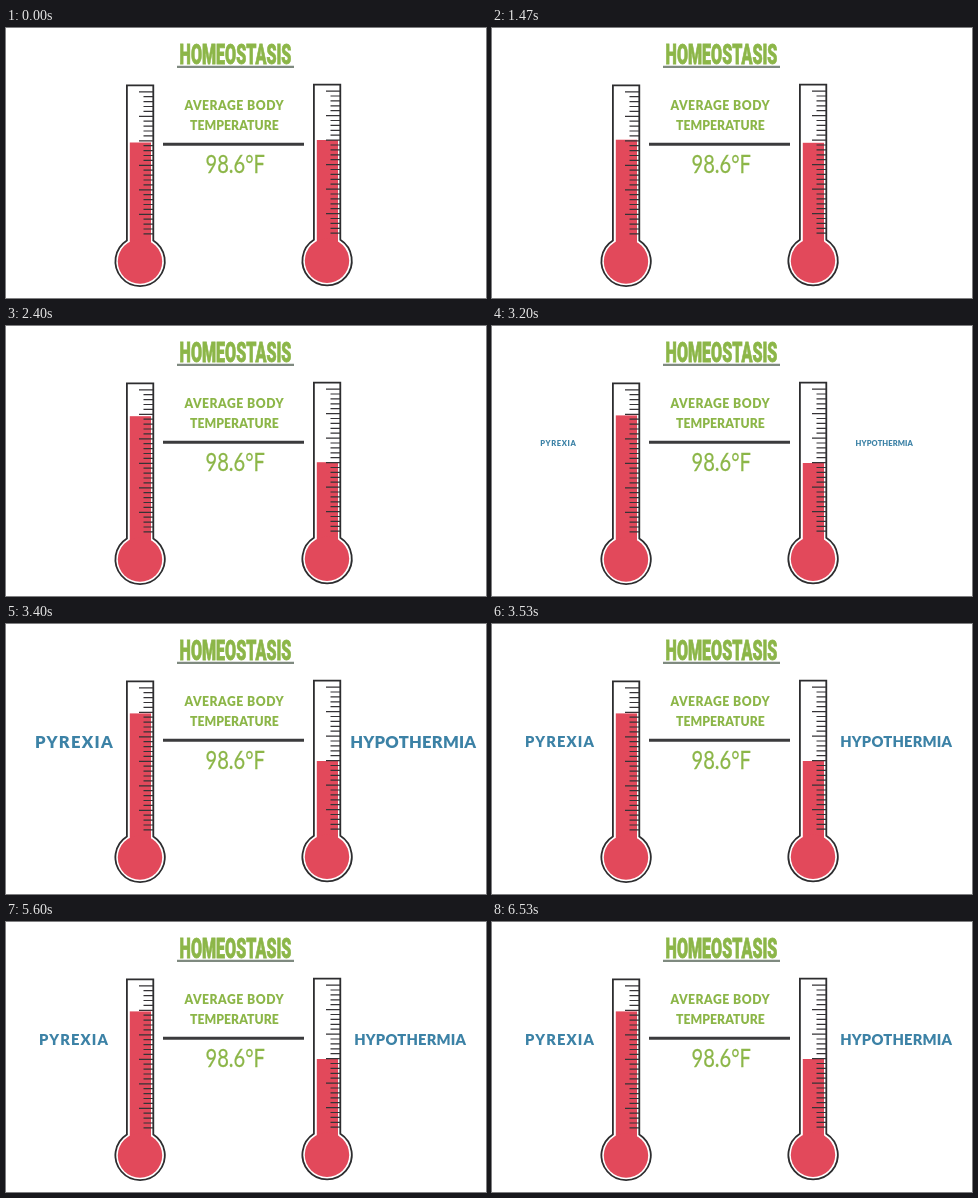
Animation of 480 by 270 pixels, one loop 6870 ms. Source, as an HTML page:

```html
<!DOCTYPE html>
<html lang="en">
<head>
<meta charset="utf-8">
<title>Homeostasis</title>
<style>
html, body { margin: 0; width: 100%; height: 100%; overflow: hidden; background: #fff; }
svg { display: block; width: 100vw; height: 100vh; font-family: Lato, sans-serif; font-weight: 900; }
.green { fill: #8cb648; text-anchor: middle; }
.blue { fill: #3c82a6; font-size: 14.7px; }
.title { font: 900 27.5px Roboto, sans-serif; stroke: #8cb648; stroke-width: .9; }
.value { font-size: 24.5px; font-weight: 400; stroke: #8cb648; stroke-width: .25; }
.glass { fill: #fff; stroke: #2d2d2f; stroke-width: 1.8; }
.fluid { fill: #e2495b; }
.ticks { fill: none; stroke: #353336; stroke-width: 1.2; }
</style>
</head>
<body>
<svg viewBox="0 0 480 270">
  <rect width="480" height="270" fill="#fff"/>
  <text class="green title" transform="translate(229.5 36.4) scale(.585 1)">HOMEOSTASIS</text>
  <path d="M171 38.9H288" stroke="#7f8a80" stroke-width="2.4"/>
  <g class="green" font-size="12.2">
    <text x="228.3" y="81.7" letter-spacing=".5">AVERAGE BODY</text>
    <text x="228.4" y="101.9" letter-spacing=".05">TEMPERATURE</text>
  </g>
  <path d="M157 116.2H298" stroke="#3b3b3d" stroke-width="3.1"/>
  <text class="green value" transform="translate(229.2 145) scale(.82 1)">98.6°F</text>
  <g id="gauges"></g>
  <text class="blue label" x="33" y="123.1" letter-spacing="1.15">PYREXIA</text>
  <text class="blue label" x="348.2" y="123.1" letter-spacing=".2">HYPOTHERMIA</text>
</svg>
<script>
const LOOP = 6870;
const clamp = v => Math.min(1, Math.max(0, v));
const span = (t, a, b) => clamp((t - a) / (b - a));
const smooth = u => u * u * (3 - 2 * u);
const mix = (a, b, u) => a + (b - a) * u;

// Fluid heights are page coordinates
const gauges = [
  { dx: 0, dy: 0, from: 114.5, to: 89.4 },
  { dx: 187, dy: -0.7, from: 112, to: 137 }
];

let ticks = '';
for (let i = 0; i < 30; i++) {
  ticks += `M${i % 5 ? 137.5 : 133} ${(63.8 + i * 4.9).toFixed(1)}H147`;
}

document.getElementById('gauges').innerHTML = gauges.map(g => `
  <g transform="translate(${g.dx} ${g.dy})">
    <path class="glass" d="M120.9 212.5V57.4H147.3V212.5A24.7 24.7 0 1 1 120.9 212.5Z"/>
    <rect class="fluid level" x="123.8" width="21.2"/>
    <circle class="fluid" cx="134" cy="233.5" r="22.2"/>
    <path class="ticks" d="${ticks}"/>
  </g>`).join('');

const levels = document.querySelectorAll('.level');
const labels = [...document.querySelectorAll('.label')].map(el => ({ el, pivot: +el.getAttribute('x') + 31.6 }));

function draw(now) {
  const t = now % LOOP;
  const u = smooth(span(t, 1190, 2545));
  gauges.forEach((g, i) => {
    const top = mix(g.from, g.to, u) - g.dy;
    levels[i].setAttribute('y', top);
    levels[i].setAttribute('height', 233 - top);
  });
  // Labels pop past full size, then settle
  const size = 1.15 * span(t, 3055, 3382) - 0.15 * span(t, 3382, 3500);
  for (const { el, pivot } of labels) {
    el.setAttribute('visibility', size > 0 ? 'visible' : 'hidden');
    el.setAttribute('transform', `translate(${pivot} 116) scale(${size}) translate(${-pivot} -116)`);
  }
}

const start = performance.now();
function frame() {
  draw(performance.now() - start);
  requestAnimationFrame(frame);
}
frame();
</script>
</body>
</html>
```
